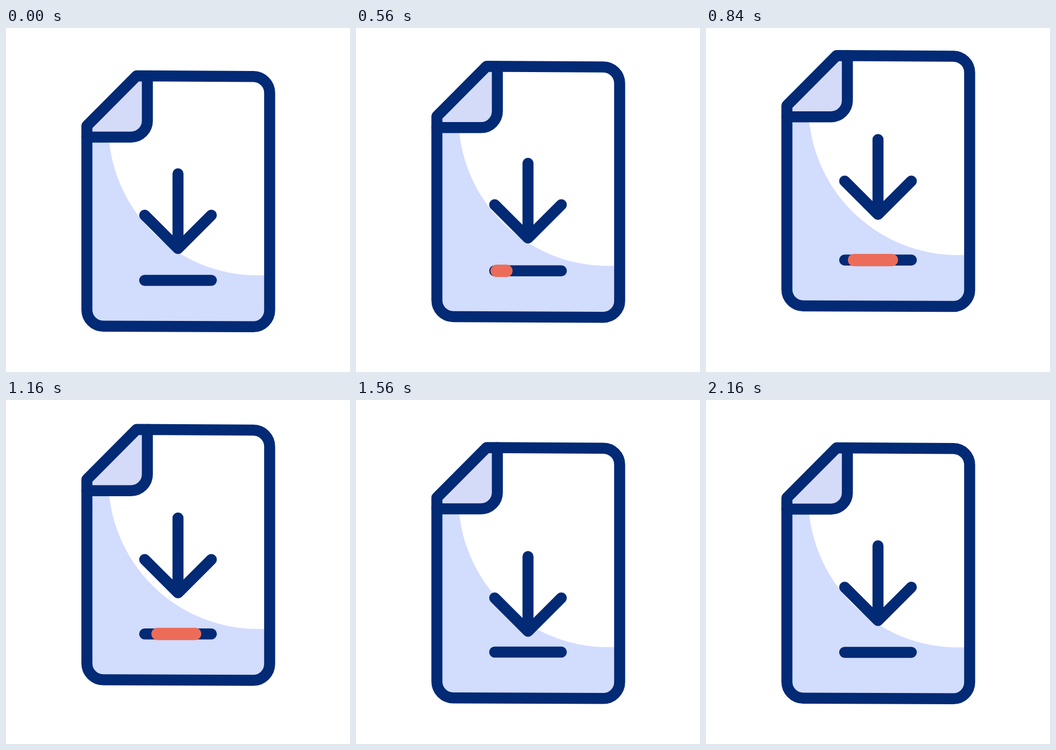
Recreate the animation shown at these times as an HTML page with a canvas. Size 640x640 px, loop 2400 ms.

```html
<!DOCTYPE html>
<html lang="en">
<head>
<meta charset="utf-8">
<title>Download file</title>
<style>
  html, body { margin: 0; width: 100%; height: 100%; overflow: hidden; background: #fff; }
  canvas { display: block; width: 640px; height: 640px; }
</style>
</head>
<body>
<canvas id="stage" width="640" height="640"></canvas>
<script>
const ctx = document.getElementById('stage').getContext('2d');
const LOOP = 2400, STEP = 40;
const NAVY = '#022a75', PALE = '#d2dcfd', FOLD = '#d4dbf8', CORAL = '#ec6c59';
const LINE = 20.5, RADIUS = 30.5;
const LEFT = 150.5, RIGHT = 490.5, TOP = 89, BOTTOM = 556;
const MID = 320, ARM = 62, TIP = 410.3, BAR_Y = 469.5;

// Bezier easing that is flat at both ends: (a, 0, b, 1).
function ease(u, a = 0.6, b = 0.4) {
  if (u <= 0 || u >= 1) return u <= 0 ? 0 : 1;
  let lo = 0, hi = 1, s = u;
  for (let i = 0; i < 30; i++) {
    const r = 1 - s;
    if (3 * s * r * (a * r + b * s) + s ** 3 < u) lo = s; else hi = s;
    s = (lo + hi) / 2;
  }
  return s * s * (3 - 2 * s);
}

const move = (t, from, to, ...curve) => ease((t - from) / (to - from), ...curve);

function pose(t) {
  const grow = move(t, 320, 940);
  return {
    page: 39 * (move(t, 960, 1640) - move(t, 280, 960, 0.46, 0.36)),
    arrow: 86 * move(t, 960, 1560) - 66 * move(t, 280, 960) - 20 * move(t, 1560, 2160),
    tail: 257 + 19 * grow + 106.5 * move(t, 1040, 1600),
    head: 257 + 91.5 * grow + 34 * move(t, 1000, 1600)
  };
}

function outlinePath() {
  const p = new Path2D();
  p.moveTo(LEFT, 182);
  p.lineTo(243, TOP);
  p.arcTo(RIGHT, TOP + 1.4, RIGHT, BOTTOM, RADIUS);
  p.arcTo(RIGHT, BOTTOM, LEFT, BOTTOM - 1.4, RADIUS);
  p.arcTo(LEFT, BOTTOM - 1.4, LEFT, 182, RADIUS);
  p.closePath();
  return p;
}

function creasePath() {
  const p = new Path2D();
  p.moveTo(263, TOP);
  p.arcTo(263, 203, LEFT, 203, RADIUS);
  p.lineTo(LEFT, 203);
  return p;
}

const outline = outlinePath();
const crease = creasePath();
const flap = new Path2D(crease);
flap.lineTo(LEFT, 182);
flap.lineTo(243, TOP);

function fill(path, color) {
  ctx.fillStyle = color;
  ctx.fill(path);
}

function stroke(path, color = NAVY, width = LINE) {
  ctx.strokeStyle = color;
  ctx.lineWidth = width;
  ctx.stroke(path);
}

function bar(x0, x1, color, width) {
  const p = new Path2D();
  p.moveTo(x0, BAR_Y);
  p.lineTo(x1, BAR_Y);
  stroke(p, color, width);
}

function drawPage() {
  const light = new Path2D();
  light.arc(468.5, 182.3, 278, 0, Math.PI * 2);
  fill(outline, PALE);
  ctx.save();
  ctx.clip(outline);
  fill(light, '#fff');
  ctx.restore();
  fill(flap, FOLD);
  stroke(crease);
  stroke(outline);
}

function drawArrow() {
  const p = new Path2D();
  p.moveTo(MID, 271.2);
  p.lineTo(MID, TIP);
  p.moveTo(MID - ARM, TIP - ARM);
  p.lineTo(MID, TIP);
  p.lineTo(MID + ARM, TIP - ARM);
  stroke(p);
}

function shifted(dy, paint) {
  ctx.save();
  ctx.translate(0, dy);
  paint();
  ctx.restore();
}

function draw(t) {
  const { page, arrow, tail, head } = pose(t);
  ctx.fillStyle = '#fff';
  ctx.fillRect(0, 0, 640, 640);
  ctx.lineCap = ctx.lineJoin = 'round';
  shifted(page, () => {
    drawPage();
    bar(MID - ARM, MID + ARM, NAVY, LINE);
    if (head - tail > 0.4) bar(tail, head, CORAL, 23);
  });
  shifted(arrow, drawArrow);
}

const start = performance.now();
function tick() {
  const t = (performance.now() - start) % LOOP;
  draw(Math.floor(t / STEP) * STEP);
  requestAnimationFrame(tick);
}
tick();
</script>
</body>
</html>
```
